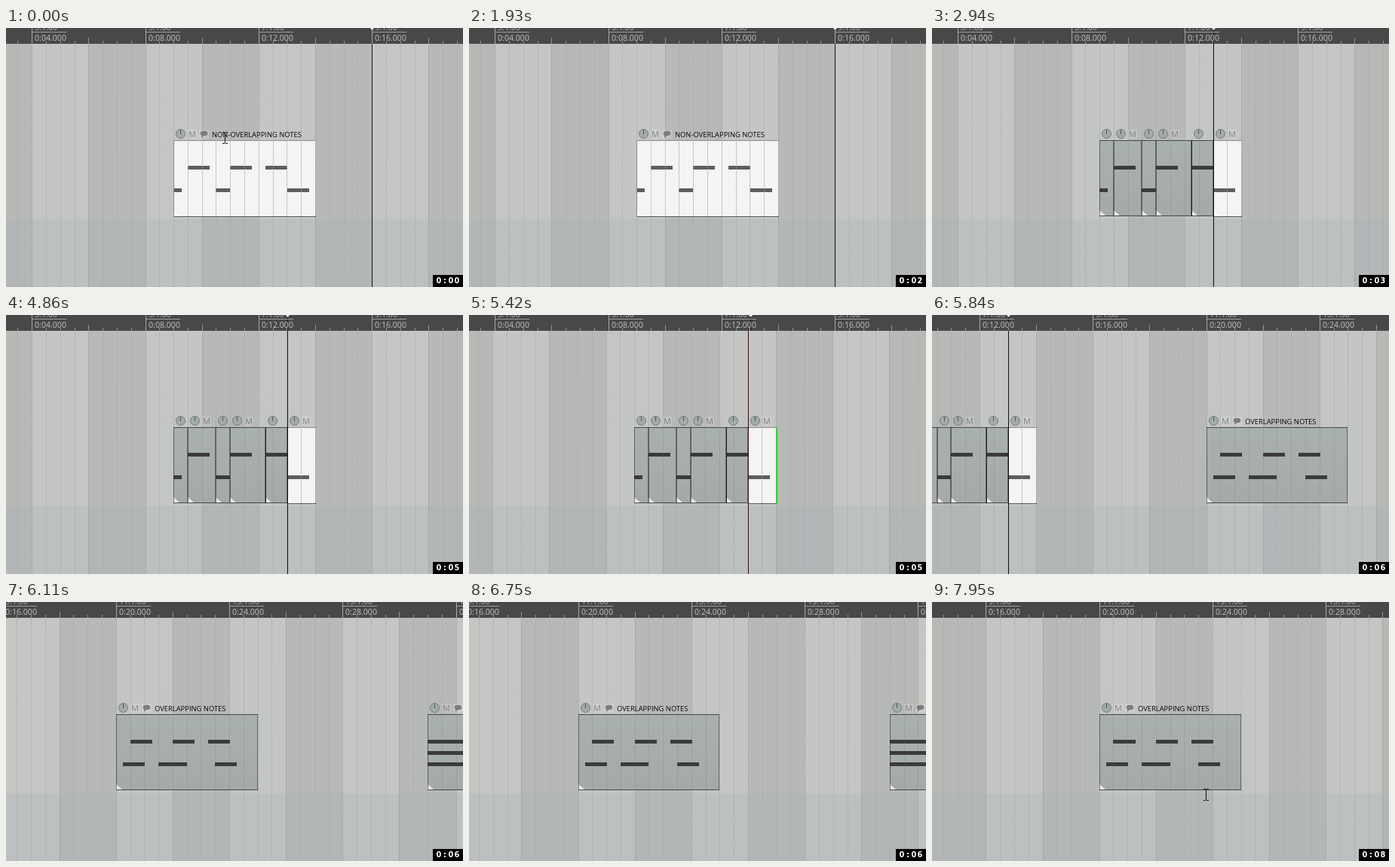
Recreate the animation shown at these times as an HTML page with a canvas. Size 606 px wide and 344 px high, loop 8000 ms.

```html
<!DOCTYPE html>
<html lang="en">
<head>
<meta charset="utf-8">
<title>Splitting items at notes</title>
<style>
html, body { margin: 0; width: 100%; height: 100%; overflow: hidden; background: #b7b9b7; }
canvas { display: block; }
</style>
</head>
<body>
<canvas id="stage" width="606" height="344"></canvas>
<script>
const W = 606, H = 344, LOOP = 8000;
const RULER = 21, TRACK_END = 254, TOP = 149;
const ORIGIN = 34.25, BEAT = 18.7875;
const SPLIT = 2670, PAN = 5420, PAN_STEP = 133, MOUSE_STEP = 138;
const PAN_FAR = 517.9, PAN_REST = 413.8;
const FONT = '"Open Sans", "Noto Sans", sans-serif';
const c = document.getElementById('stage').getContext('2d');

// Item and note positions and lengths are in beats.
const HELD = 1.55;
const phrase = (starts, lengths) => starts.map((start, i) => ({ start, len: lengths[i] || HELD, row: [1, 0, 1, 0, 0, 1][i] }));
const spaced = { start: 10, len: 10.05, name: 'NON-OVERLAPPING NOTES',
  notes: phrase([0, 1, 3, 4, 6.5, 8.04], [.6, 0, 1]) };
const crossed = { start: 32, len: 10, name: 'OVERLAPPING NOTES',
  notes: phrase([.5, 1, 3, 4, 6.5, 7], [0, 0, 2]) };
const chords = { start: 54, len: 10, name: 'CHORDS',
  notes: [0, .5, 1].map(row => ({ start: 0, len: 10, row })) };

const mousePath = [[0, 290, 146], [345, 406, 137], [760, 256, 136], [1242, 411, 141],
  [1380, 411, 141], [1518, 413, 151], [1656, 521, 278]];

const ease = p => p * p * (3 - 2 * p);
const tween = (t, t0, t1, a, b) => a + (b - a) * ease(Math.min(1, Math.max(0, (t - t0) / (t1 - t0))));
const hold = (t, start, step) => start + Math.floor((t - start) / step) * step;

let scroll = 0;
const beatX = k => Math.round(ORIGIN + k * BEAT - scroll);

function scrollAt(t) {
  if (t < PAN) return 0;
  const h = hold(t, PAN, PAN_STEP), back = PAN + 9 * PAN_STEP;
  return h < back ? tween(h, PAN, PAN + 775, 3, PAN_FAR)
    : tween(h, back, back + 3 * PAN_STEP, PAN_FAR, PAN_REST);
}

function mouseAt(t) {
  if (t >= 7830) return [363, 256];
  const h = hold(t, 0, MOUSE_STEP);
  const i = mousePath.findIndex(p => p[0] >= h);
  if (i < 0) return null;
  const [t1, x1, y1] = mousePath[i], [t0, x0, y0] = mousePath[Math.max(0, i - 1)];
  if (t1 === h) return [x1, y1];
  return [tween(h, t0, t1, x0, x1), tween(h, t0, t1, y0, y1)].map(Math.round);
}

function rect(x, y, w, h, color) {
  c.fillStyle = color;
  c.fillRect(x, y, w, h);
}

function text(str, x, y, size, color, align = 'left', font = FONT) {
  c.font = `${size}px ${font}`;
  c.textAlign = align;
  c.fillStyle = color;
  c.fillText(str, x, y);
}

function shape(points, color) {
  c.fillStyle = color;
  c.beginPath();
  points.forEach(p => c.lineTo(...p));
  c.fill();
}

function dotted(x, y, h, color) {
  c.strokeStyle = color;
  c.lineWidth = 1;
  c.setLineDash([1, 1]);
  c.beginPath();
  c.moveTo(x + .5, y);
  c.lineTo(x + .5, y + h);
  c.stroke();
  c.setLineDash([]);
}

function eachBeat(draw) {
  const first = Math.floor((scroll - ORIGIN) / BEAT) - 5;
  for (let k = first; k < first + 44; k++) draw(k, beatX(k));
}

function drawTracks() {
  eachBeat((k, x) => {
    if (k % 4) return;
    const light = k % 8 === 0, w = beatX(k + 4) - x;
    rect(x, RULER, w, TRACK_END - RULER, light ? '#c4c6c4' : '#b7b9b7');
    rect(x, TRACK_END, w, H - TRACK_END, light ? '#bcc0c0' : '#b2b6b7');
  });
  eachBeat((k, x) => dotted(x, RULER, H - RULER, k % 4 ? '#a6a8a7' : '#989a99'));
}

function drawRuler(cursor) {
  const x = beatX(cursor);
  rect(0, 0, W, RULER, '#484848');
  rect(x, 0, 1, RULER, '#111');
  eachBeat((k, tickX) => {
    const major = k % 8 === 0;
    const y = major ? 0 : k % 4 ? 17 : 13;
    rect(tickX, y, 1, RULER - y, major ? '#a8a8a8' : '#929292');
    if (!major) return;
    const measure = k / 4 + 3, seconds = k / 2 + 4;
    text(measure + '.1.00', tickX + 4, 3, 10.6, '#b4b7ba');
    rect(tickX + 1, 5, 45, 1, '#9c9c9c');
    text(`0:${String(seconds).padStart(2, '0')}.000`, tickX + 4, 16.5, 10.6, '#c4c2be');
  });
  shape([[x - 2, 0], [x + 3, 0], [x + .5, 3]], '#eee');
}

function drawHeader(x, w, name) {
  const button = (dx, width) => rect(x + dx, 135, width, 12, 'rgba(255,255,255,.15)');
  c.lineWidth = 1;
  c.strokeStyle = '#747c7c';
  c.fillStyle = '#a3aaaa';
  c.beginPath();
  c.arc(x + 9.5, 140.5, 6, 0, 7);
  c.fill();
  c.stroke();
  rect(x + 9, 135, 1, 6, '#505858');
  if (w > 32) {
    button(19, 12);
    text('M', x + 25, 145, 11, '#828482', 'center');
  }
  if (w < 100) return;
  button(34, 13);
  c.fillStyle = '#7b7d7b';
  c.beginPath();
  c.ellipse(x + 40.5, 140, 4.8, 3.2, 0, 0, 7);
  c.fill();
  shape([[x + 37, 141], [x + 41, 142], [x + 37, 146]], '#7b7d7b');
  text(name, x + 51, 145, 9.38, '#080808');
}

function drawItem(item, from, to, selected) {
  const x = beatX(item.start + from), w = beatX(item.start + to) - x;
  if (x > W || x + w < 0) return;
  const h = selected ? 102 : 101;
  c.save();
  c.beginPath();
  c.rect(x, TOP, w, h);
  c.clip();
  const fill = c.createLinearGradient(0, TOP, 0, TOP + h);
  fill.addColorStop(0, '#a9b0b0');
  fill.addColorStop(1, '#a6a9a9');
  rect(x, TOP, w, h, selected ? '#f4f4f4' : fill);
  shape([[x, 242], [x, 250], [x + 9, 250]], selected ? '#fff' : '#eee');
  rect(x, TOP, w, 1, selected ? '#8c8c8c' : '#454848');
  rect(x, TOP + h - 1, w, 1, selected ? '#5c5c5c' : '#454848');
  for (const { start, len, row } of item.notes) {
    const left = beatX(item.start + start), right = beatX(item.start + start + len);
    rect(left, 183 + row * 30, right - left, 5, selected ? '#5e5e5e' : '#3b3b3b');
  }
  eachBeat((k, gx) => dotted(gx, TOP, h, selected ? '#999' : 'rgba(90,95,95,.3)'));
  if (selected) rect(x, TOP, 1, h, '#888');
  else if (Number.isInteger(item.start + from)) dotted(x, TOP, h, '#111');
  else rect(x, TOP, 1, h, '#222');
  dotted(x + w - 1, TOP, h, selected ? '#666' : '#222');
  c.restore();
  drawHeader(x, w, item.name);
}

function drawMouse([x, y]) {
  if (y > TOP && Math.abs(x - beatX(spaced.start + spaced.len)) < 6) {
    rect(x - 8, y, 17, 1, '#111');
    for (const side of [-1, 1])
      shape([[x + .5 + side * 12, y + .5], [x + .5 + side * 7, y - 4], [x + .5 + side * 7, y + 5]], '#111');
    rect(x, y - 5, 1, 11, '#111');
    return;
  }
  rect(x, y - 7, 1, 14, '#111');
  for (const edge of [y - 8, y + 7]) {
    rect(x - 3, edge, 3, 1, '#111');
    rect(x + 1, edge, 3, 1, '#111');
  }
}

function drawClock(t) {
  const seconds = Math.floor((t + 175) / 1000);
  rect(566, 328, 40, 16, '#000');
  [...`0:0${seconds}`].forEach((ch, i) =>
    text(ch, 574 + i * 8, 339, 'bold 9.8', '#fff', 'center', '"DejaVu Sans", sans-serif'));
}

function draw(t) {
  const split = t >= SPLIT, grabbed = t >= PAN && t < PAN + PAN_STEP;
  const cursor = split ? 18.04 : 24;
  scroll = scrollAt(t);

  drawTracks();
  if (split) {
    spaced.notes.forEach(({ start }, i, all) => {
      const next = all[i + 1];
      drawItem(spaced, start, next ? next.start : spaced.len, !next);
    });
  } else drawItem(spaced, 0, spaced.len, true);
  drawItem(crossed, 0, crossed.len, false);
  drawItem(chords, 0, chords.len, false);
  if (grabbed) rect(beatX(spaced.start + spaced.len) - 1, TOP + 1, 2, 100, '#1be01b');
  rect(beatX(cursor), RULER, 1, H - RULER, grabbed ? '#5e0a0e' : '#111');

  // The ruler catches up one step after the tracks start to move.
  if (grabbed) scroll = 0;
  drawRuler(cursor);
  const mouse = mouseAt(t);
  if (mouse) drawMouse(mouse);
  drawClock(t);
}

function tick(now) {
  draw(now % LOOP);
  requestAnimationFrame(tick);
}
draw(0);
requestAnimationFrame(tick);
</script>
</body>
</html>
```
